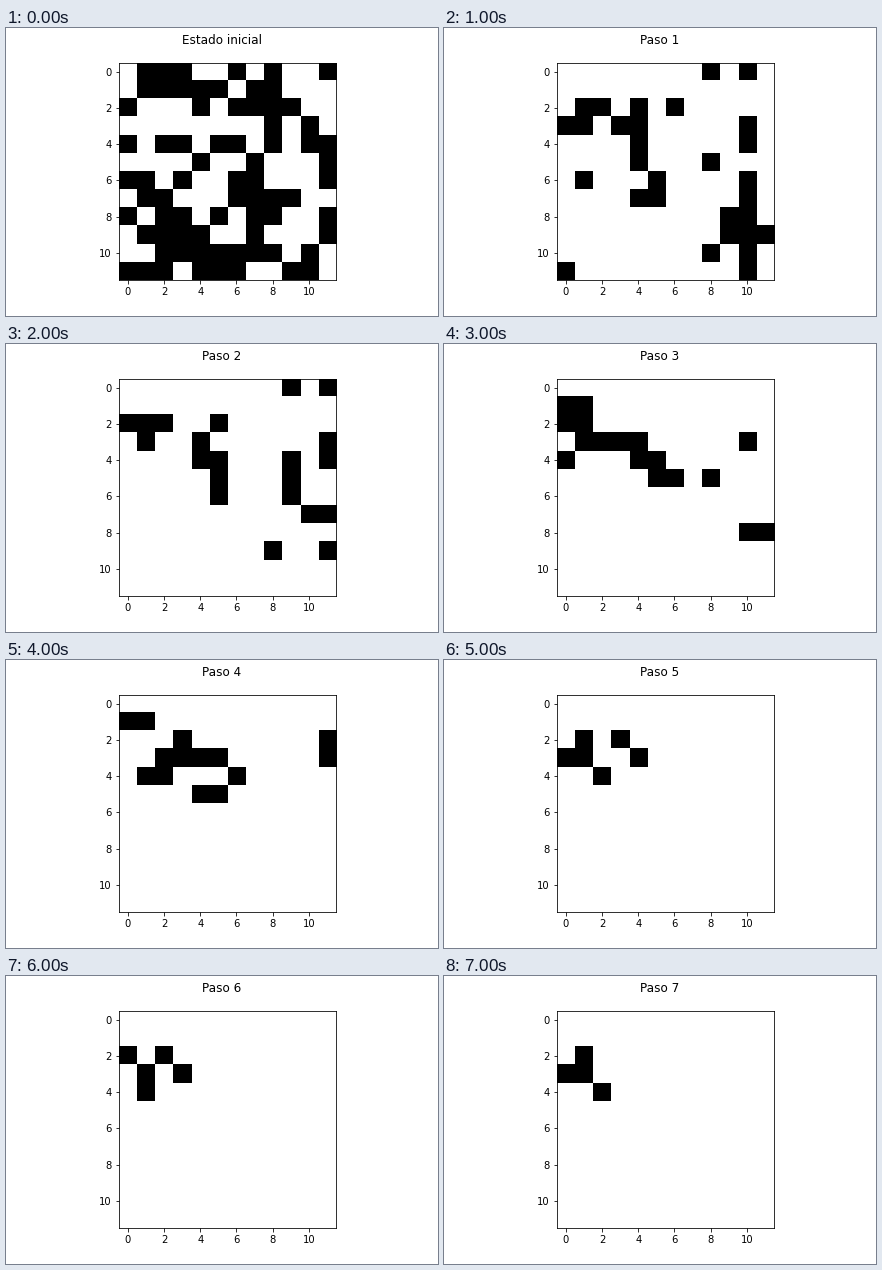
Animation of 432 by 288 pixels, one loop 8 s. Source, as a matplotlib script:

```python
import numpy as np
import matplotlib.pyplot as plt
from matplotlib.animation import FuncAnimation

STEPS = 8
START = """
.###..#.#..#
.#####.##...
#...#.####..
........#.#.
#.##.##.#.##
....#..#...#
##.#..##...#
.##...####..
#.##.#.##..#
.####..#...#
..#######.#.
###.###..##.
"""


def step(grid):
    """A cell lives next exactly when it has three live neighbours (wrapped edges)."""
    shifts = [(dy, dx) for dy in (-1, 0, 1) for dx in (-1, 0, 1) if dy or dx]
    neighbours = sum(np.roll(grid, s, axis=(0, 1)) for s in shifts)
    return (neighbours == 3).astype(int)


states = [np.array([[int(c == "#") for c in row] for row in START.split()])]
while len(states) < STEPS:
    states.append(step(states[-1]))

plt.rcParams.update({"font.family": "DejaVu Sans", "font.size": 10})
fig = plt.figure(figsize=(6, 4), dpi=72, facecolor="white")
fig.subplots_adjust(left=0.125, right=0.9, bottom=0.125, top=0.88)
ax = fig.add_subplot()
image = ax.imshow(states[0], cmap="binary", vmin=0, vmax=1, interpolation="nearest")
ax.set_xticks(range(0, 12, 2))
ax.set_yticks(range(0, 12, 2))
title = fig.suptitle("Estado inicial", fontsize=12)


def draw(i):
    image.set_data(states[i])
    title.set_text(f"Paso {i}" if i else "Estado inicial")
    return image, title


anim = FuncAnimation(fig, draw, frames=STEPS, interval=1000, repeat=True, repeat_delay=0)
plt.show()
```
